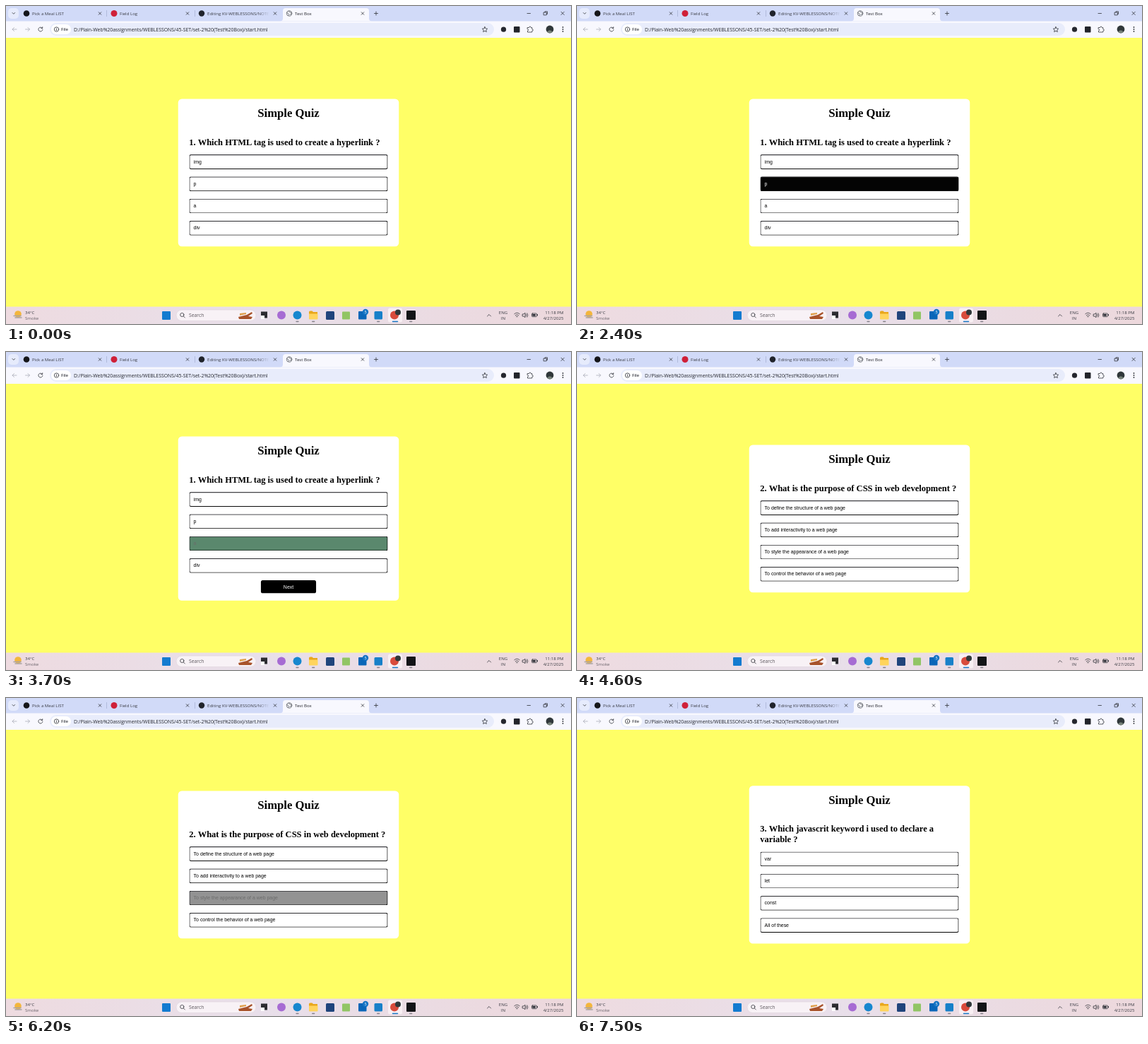
Recreate the animation shown at these times as an HTML page. Size 800 by 450 pixels, loop 8000 ms.

```html
<!DOCTYPE html>
<html lang="en">
<head>
<meta charset="utf-8">
<title>Simple Quiz</title>
<style>
  html, body { margin: 0; width: 100%; height: 100%; overflow: hidden; background: #ffff66; }
  #stage { position: relative; width: 800px; height: 450px; overflow: hidden; }
  svg { position: absolute; left: 0; top: 0; }
  svg text { font-family: "Open Sans", "Noto Sans", sans-serif; font-size: 6.1px; fill: #3a3c44; }
  .line { fill: none; stroke: #33353c; stroke-width: .8; stroke-linecap: round; stroke-linejoin: round; }
  .pale { stroke: #a9abb6; }

  /* The page is laid out at 1536 px and scaled down to the stage. */
  #page {
    position: absolute; left: 0; top: 45px; width: 1536px; height: 732px;
    display: flex; align-items: center; justify-content: center;
    transform: scale(.520833); transform-origin: 0 0;
  }
  #card { box-sizing: border-box; width: 600px; padding: 20px 30px; background: #fff; border-radius: 10px; color: #000; }
  h1, h2 { margin: 0; font-family: "Liberation Serif", "Times New Roman", serif; font-weight: bold; }
  h1 { font-size: 32px; line-height: 37px; text-align: center; }
  h2 { margin: 46px 0 20px; font-size: 24px; line-height: 28px; }
  .option, #next { box-sizing: border-box; font: 13.333px/16px "Liberation Sans", Arial, sans-serif; border-radius: 5px; }
  .option { height: 40px; margin-bottom: 20px; padding: 10px; border: 2px solid; border-color: #2c2c30 #000 #000 #2c2c30; }
  .option:nth-child(4) { margin-bottom: 10px; }
  #next { width: 150px; height: 35px; margin: 20px auto 0; padding: 10px; line-height: 15px; text-align: center; background: #000; color: #fff; }
</style>
</head>
<body>
<div id="stage">
  <svg width="800" height="450" viewBox="0 0 800 450">
    <defs>
      <linearGradient id="bar">
        <stop offset="0" stop-color="#eedbe0"/>
        <stop offset=".45" stop-color="#e8dfea"/>
        <stop offset="1" stop-color="#edd8dc"/>
      </linearGradient>
      <linearGradient id="fade">
        <stop offset="0" stop-color="#d1daf8" stop-opacity="0"/>
        <stop offset="1" stop-color="#d1daf8"/>
      </linearGradient>
    </defs>

    <!-- tab strip -->
    <rect width="800" height="22" fill="#d1daf8"/>
    <rect x="3" y="3" width="15" height="15" rx="5" fill="#e6ebfc"/>
    <path class="line" d="M9 9.5l1.8 1.8 1.8-1.8"/>
    <path d="M388 21.5q4 0 4-4V7q0-4 4-4h114q4 0 4 4v10.500q0 4 4 4z" fill="#f8f8fe"/>
    <path d="M142.500 6v9M267.500 6v9" stroke="#a4aed0" stroke-width=".7"/>
    <circle cx="29" cy="10.500" r="4.300" fill="#15161a"/>
    <circle cx="153" cy="10.500" r="4.500" fill="#cf2038"/>
    <circle cx="277" cy="10.500" r="4.200" fill="#20232b"/>
    <g class="line" style="stroke:#55585f">
      <circle cx="401" cy="10.500" r="3.700"/>
      <path d="M397.500 9.500l2 1 1 2-1 1M400.500 7l1.500 2 2.500.2M402 12l2-.5"/>
    </g>
    <text x="37" y="12.800">Pick a Meal LIST</text>
    <text x="161" y="12.800">Field Log</text>
    <text x="285" y="12.800">Editing KV-WEBLESSONS/NOTES</text>
    <rect x="356" y="4" width="17" height="14" fill="url(#fade)"/>
    <rect x="373" y="4" width="16" height="14" fill="#d1daf8"/>
    <text x="409" y="12.800" style="fill:#202228">Test Box</text>
    <g id="crosses" class="line"></g>
    <path class="line" d="M524 8v5M521.500 10.500h5M738 10.500h4.500M761.500 9h3.800v3.800h-3.800zM763 9V7.800h3.500v3.600h-1M786 8.200l4.300 4.300M790.300 8.200L786 12.500"/>

    <!-- toolbar -->
    <rect y="21.500" width="800" height="23.500" fill="#f8f8fe"/>
    <path class="line pale" d="M15 33H9M11.500 30.500L9 33l2.500 2.500M27.500 33h6M31 30.500l2.500 2.500-2.500 2.500"/>
    <path class="line" d="M51.300 31.200a3 3 0 1 0 .6 2.300M51.700 29.700v2h-2"/>
    <rect x="62" y="24" width="629" height="18" rx="9" fill="#e8ecfb"/>
    <rect x="64" y="26" width="28" height="14" rx="7" fill="#fff"/>
    <circle class="line" cx="71.500" cy="33" r="3.200"/>
    <path class="line" d="M71.500 32.800v1.700M71.500 31.300v.1"/>
    <text x="78" y="35.300" style="font-size:6px;font-weight:600">File</text>
    <text x="96" y="35.500" style="font-size:6.900px;fill:#24262d">D:/Plain-Web%20assignments/WEBLESSONS/45-SET/set-2%20(Test%20Box)/start.html</text>
    <path class="line" d="M678 29.500l1.100 2.400 2.600.3-1.900 1.800.5 2.600-2.300-1.300-2.300 1.300.5-2.600-1.900-1.800 2.600-.3z"/>
    <circle cx="704.500" cy="33.200" r="3.600" fill="#25272e"/>
    <rect x="719" y="29" width="8.500" height="8.500" rx="1" fill="#22242a"/>
    <path class="line" d="M738.500 30.500h2.200q.2-1.500 1.300-1.500t1.300 1.500h1.500v2.200q1.500.2 1.500 1.300t-1.500 1.300v1.700h-6.300v-2q1.300-.3 1.300-1.200t-1.300-1.100z"/>
    <circle cx="770" cy="33" r="5.400" fill="#30373a"/>
    <path d="M766 36.700q4-5 8 0-4 3.300-8 0z" fill="#758078"/>
    <g fill="#33353c"><circle cx="788.500" cy="30" r=".9"/><circle cx="788.500" cy="33" r=".9"/><circle cx="788.500" cy="36" r=".9"/></g>

    <!-- taskbar -->
    <rect y="425.500" width="800" height="24.500" fill="url(#bar)"/>
    <circle cx="17" cy="436" r="4.800" fill="#f3b63c"/>
    <path d="M11 438.500h10M13 441h9" stroke="#a8a3a4" stroke-width="1.600" stroke-linecap="round"/>
    <text x="27" y="435.700">34°C</text>
    <text x="27" y="443.700" style="fill:#6a646b">Smoke</text>
    <rect x="221" y="432" width="12" height="12" rx="1" fill="#137bd0"/>
    <rect x="241" y="430" width="113" height="15.500" rx="7.700" fill="#f8f2f6" stroke="#d9ced7" stroke-width=".5"/>
    <circle class="line" cx="249.300" cy="437" r="2.600"/>
    <path class="line" d="M251.300 439l2 2"/>
    <text x="259" y="440.200" style="font-size:6.800px;fill:#5d585f">Search</text>
    <path d="M329 440l12-3 7-4 1 2-6 4 6 1-2 3h-17z" fill="#a8532b"/>
    <path d="M331 435l9-1v2l-9 2z" fill="#e0a04d"/>
    <rect x="361" y="432.500" width="9" height="9" fill="#2c2c31"/>
    <rect x="361" y="438" width="5" height="5" fill="#fff"/>
    <circle cx="390" cy="437.500" r="6" fill="#a66bd3"/>
    <circle cx="412.500" cy="437.500" r="6" fill="#1687cf"/>
    <path d="M429 433q0-1.500 1.500-1.500h3l1.500 1.500h6v10h-12z" fill="#e9a71b"/>
    <path d="M429 435.500h12.500v7q0 1-1 1H430q-1 0-1-1z" fill="#ffd45d"/>
    <rect x="453" y="432" width="12" height="12" rx="1.500" fill="#20447c"/>
    <rect x="476" y="432.500" width="11" height="11" rx="1" fill="#91c564"/>
    <rect x="499" y="432" width="11.500" height="11.500" rx="1" fill="#0a66b8"/>
    <circle cx="509" cy="433" r="4.200" fill="#1674c4"/>
    <text x="509" y="435" text-anchor="middle" style="font-size:5.500px;fill:#fff">5</text>
    <rect x="521.500" y="432" width="11.500" height="11.500" rx="1.500" fill="#1780c9"/>
    <rect x="541" y="427.500" width="20" height="20" rx="2.500" fill="#f8eff3"/>
    <circle cx="550" cy="437.500" r="6" fill="#d94b3c"/>
    <circle cx="555" cy="433.500" r="4" fill="#30373a"/>
    <rect x="567" y="431" width="13" height="13" rx="1" fill="#131417"/>
    <path d="M411 446.500h3M433.700 446.500h3M525.700 446.500h3M571.700 446.500h3" stroke="#85808a" stroke-width="1.300" stroke-linecap="round"/>
    <path d="M547.500 446.500h7" stroke="#1674c4" stroke-width="1.500" stroke-linecap="round"/>
    <path class="line" d="M681.500 439l2.500-2.500 2.500 2.500"/>
    <g text-anchor="middle"><text x="704" y="435.700">ENG</text><text x="704" y="443.700">IN</text></g>
    <path class="line" d="M719.800 435.700q3.700-3.200 7.400 0M721.200 437.700q2.300-2 4.600 0M722.700 439.600h1.600M731.500 436h1.500l2-1.800v6.600l-2-1.800h-1.500zM736.500 436q1 1.500 0 3M738 434.800q2 2.700 0 5.400"/>
    <rect class="line" x="744.500" y="435" width="7" height="4.700" rx="1"/>
    <path d="M745.300 436h4.500v2.800h-4.500zM752 436.300h1v2h-1z" fill="#33353c"/>
    <g text-anchor="end"><text x="789.500" y="435.700">11:18 PM</text><text x="789.500" y="443.700">4/27/2025</text></g>
  </svg>

  <div id="page">
    <div id="card">
      <h1>Simple Quiz</h1>
      <h2></h2>
      <div id="options"></div>
      <div id="next">Next</div>
    </div>
  </div>
</div>

<script>
const LOOP = 8000, FADE = 300;
const BLACK = [0, 0, 0], WHITE = [255, 255, 255], GREEN = [154, 234, 188];

// hovers: [option, enter, leave]; pick: [option, time]
const quiz = [
  { from: 0, title: '1. Which HTML tag is used to create a hyperlink ?',
    options: ['img', 'p', 'a', 'div'],
    hovers: [[0, 1490, 1950], [1, 2150, 2500], [2, 2650, LOOP]], pick: [2, 3600] },
  { from: 4600, title: '2. What is the purpose of CSS in web development ?',
    options: ['To define the structure of a web page', 'To add interactivity to a web page',
      'To style the appearance of a web page', 'To control the behavior of a web page'],
    hovers: [[0, 5250, 5760], [2, 6124, LOOP]], pick: [2, 6700] },
  { from: 7400, title: '3. Which javascrit keyword i used to declare a variable ?',
    options: ['var', 'let', 'const', 'All of these'], hovers: [], pick: [0, LOOP] }
];

const $ = s => document.querySelector(s);
const heading = $('h2'), next = $('#next');
const rows = [0, 1, 2, 3].map(() => {
  const row = document.createElement('div');
  row.className = 'option';
  $('#options').append(row);
  return row;
});
$('#crosses').innerHTML = [133, 257, 381, 505]
  .map(x => `<path d="M${x - 1.8} 8.700l3.600 3.600M${x + 1.8} 8.700l-3.600 3.600"/>`).join('');

// CSS "ease", cubic-bezier(.25, .1, .25, 1)
function ease(x) {
  if (x <= 0) return 0;
  if (x >= 1) return 1;
  const bezier = (a, b, u) => 3 * a * u * (1 - u) ** 2 + 3 * b * u * u * (1 - u) + u ** 3;
  let lo = 0, hi = 1;
  for (let i = 0; i < 24; i++) {
    const mid = (lo + hi) / 2;
    if (bezier(.25, .25, mid) < x) lo = mid; else hi = mid;
  }
  return bezier(.1, 1, lo);
}

const progress = (t, start) => ease((t - start) / FADE);
const mix = (a, b, k) => a.map((v, i) => v + (b[i] - v) * k);
const css = c => `rgb(${c.map(Math.round)})`;

let shown = null;
function render(t) {
  const q = quiz.filter(item => item.from <= t).pop();
  if (q !== shown) {
    shown = q;
    heading.textContent = q.title;
    rows.forEach((row, i) => row.textContent = q.options[i]);
  }
  const [picked, pickTime] = q.pick;
  next.style.display = t >= pickTime ? 'block' : 'none';
  rows.forEach((row, i) => {
    let dark = 0;
    for (const [option, enter, leave] of q.hovers)
      if (option === i) dark += progress(t, enter) - progress(t, leave);
    let back = mix(WHITE, BLACK, dark), ink = mix(BLACK, WHITE, dark);
    if (i === picked) {
      const k = progress(t, pickTime);
      back = mix(back, GREEN, k);
      ink = mix(ink, BLACK, k);
    }
    row.style.backgroundColor = css(back);
    row.style.color = css(ink);
  });
}

const start = performance.now();
function tick() {
  render((performance.now() - start) % LOOP);
  requestAnimationFrame(tick);
}
tick();
</script>
</body>
</html>
```
